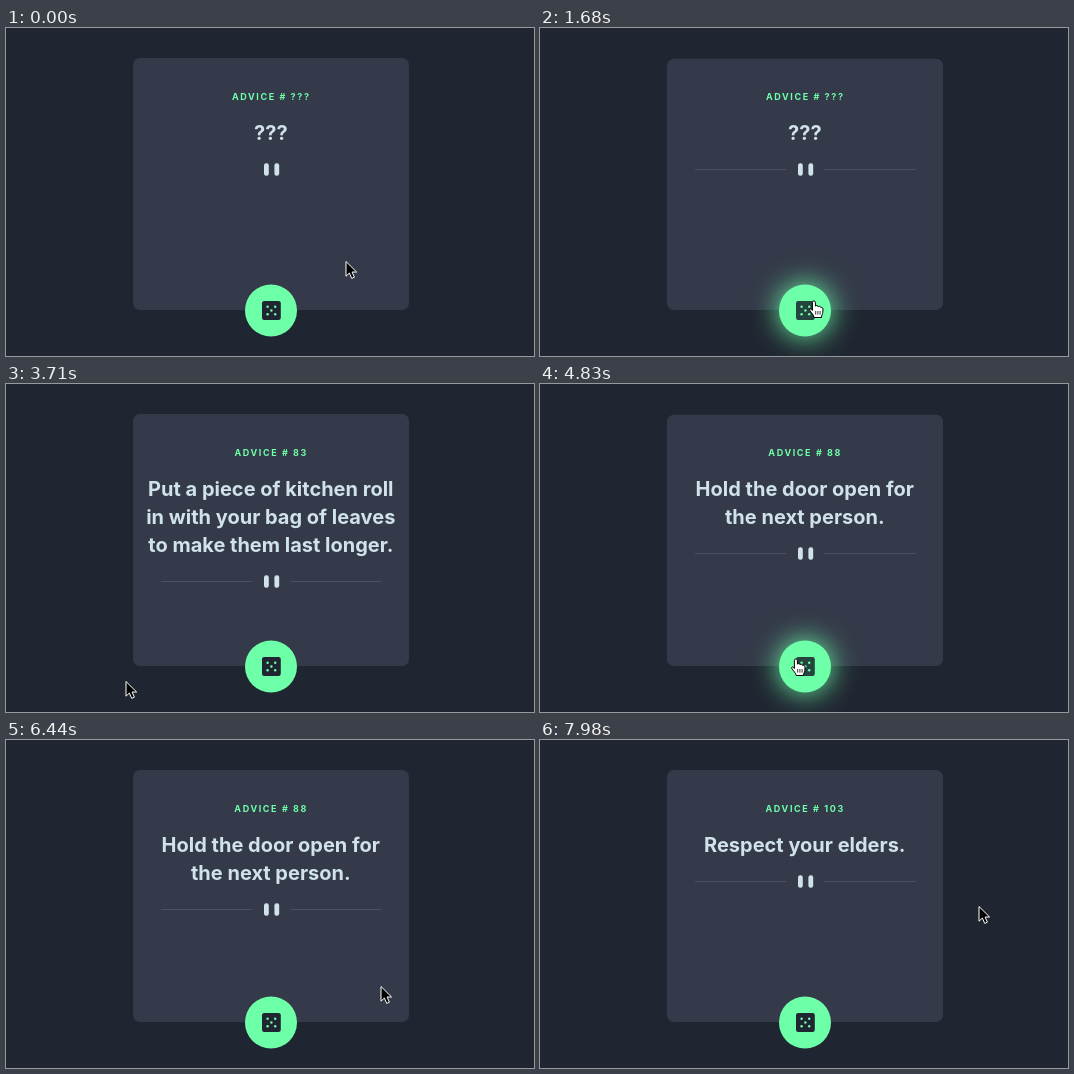
An HTML page for the animation above (8 s loop, 528 by 328 pixels).

```html
<!DOCTYPE html>
<html lang="en">
<head>
<meta charset="utf-8">
<title>Advice card</title>
<style>
  html, body { margin: 0; width: 100%; height: 100%; overflow: hidden; background: #202631; }
  svg { display: block; width: 528px; height: 328px; }
  text { font-family: Inter, "Open Sans", sans-serif; font-weight: 700; text-anchor: middle; }
  #label { font-size: 9px; letter-spacing: 1.6px; fill: #6effa9; }
  .quote { font-size: 20px; fill: #d0e2ea; }
</style>
</head>
<body>
<svg viewBox="0 0 528 328">
  <defs>
    <filter id="blur" x="-150%" y="-150%" width="400%" height="400%" color-interpolation-filters="sRGB">
      <feGaussianBlur stdDeviation="14"/>
    </filter>
  </defs>
  <rect width="528" height="328" fill="#202631"/>
  <rect id="card" x="127" width="276" rx="7" fill="#343a49"/>
  <text id="label" x="265.2" y="72"></text>
  <g id="quote"></g>
  <g id="divider">
    <path id="rules" d="M155 0H246M284.5 0H375.6" stroke="#485265"/>
    <g fill="#d0e2ea">
      <rect x="258" y="-6.2" width="4.8" height="12.4" rx="2.2"/>
      <rect x="268.4" y="-6.2" width="4.8" height="12.4" rx="2.2"/>
    </g>
  </g>
  <circle id="glow" cx="265" cy="282.5" r="26" fill="#6effa9" filter="url(#blur)"/>
  <circle cx="265" cy="282.5" r="26" fill="#6effa9"/>
  <g id="die" transform="translate(265.4 282.5)">
    <rect id="face" x="-9.4" y="-9.4" width="18.8" height="18.8" rx="2.2"/>
  </g>
  <g id="cursor">
    <path id="arrow" d="M0 .5V15.2L3.4 12L5.7 17.4L8.4 16.2L6.1 11H10.6Z" fill="#000" stroke="#fff"/>
    <g id="hand" stroke="#000" stroke-linejoin="round">
      <path d="M-1.6 9.5V1.2C-1.6 -.6 1.3 -.6 1.3 1.2L1.5 5.2C1.8 4.2 4 4.3 4.2 5.8C4.6 4.9 6.6 5.1 6.8 6.6C7.4 6 9 6.4 9 8L8.8 11.5C8.6 13.3 7.6 14 7.5 16.5H.2C-.2 14 -2.6 12 -4.2 9.4C-5 7.8 -3 7 -1.6 9.5Z"
        fill="#fff"/>
      <path d="M1.7 10V13.6M3.9 10V13.6M6.1 10V13.6" fill="none" stroke-width=".8"/>
    </g>
  </g>
</svg>
<script>
const LOOP = 8000, STEP = 70, LINE = 28;
const BUTTON = { x: 265, y: 282.5, r: 26 };
const $ = id => document.getElementById(id);

function add(parent, tag, attrs) {
  const el = document.createElementNS('http://www.w3.org/2000/svg', tag);
  for (const key in attrs) el.setAttribute(key, attrs[key]);
  return parent.appendChild(el);
}

const quoteLines = [0, 1, 2].map(i =>
  add($('quote'), 'text', { class: 'quote', x: 264.8, y: 112 + LINE * i }));

// five pips: the centre and four corners
add($('die'), 'circle', { r: 1.2, fill: '#6effa9' });
for (const cx of [-3.8, 3.8])
  for (const cy of [-3.8, 3.8]) add($('die'), 'circle', { cx, cy, r: 1.2, fill: '#6effa9' });

const advice = [
  { from: 0, id: '???', lines: ['???'] },
  { from: 2660, id: '83', lines: ['Put a piece of kitchen roll', 'in with your bag of leaves', 'to make them last longer.'] },
  { from: 4830, id: '88', lines: ['Hold the door open for', 'the next person.'] },
  { from: 7700, id: '103', lines: ['Respect your elders.'] }
];

// each move eases the pointer from wherever it rests
const moves = [
  { from: 0, to: 910, x: 294, y: 234 },
  { from: 910, to: 1680, x: 274, y: 273 },
  { from: 3080, to: 3710, x: 120, y: 297 },
  { from: 3710, to: 4200, x: 262, y: 277 },
  { from: 4760, to: 5040, x: 225, y: 262 },
  { from: 5040, to: 5250, x: 249, y: 281 },
  { from: 5740, to: 6440, x: 375, y: 246 },
  { from: 6440, to: 7420, x: 272, y: 277 },
  { from: 7630, to: 7980, x: 439, y: 166 }
];

const clamp = p => Math.min(1, Math.max(0, p));
const ease = p => p * p * (3 - 2 * p);
const lerp = (a, b, p) => a + (b - a) * p;

function pointer(t) {
  let x = 340, y = 233;
  for (const m of moves) {
    const p = ease(clamp((t - m.from) / (m.to - m.from)));
    x = lerp(x, m.x, p);
    y = lerp(y, m.y, p);
  }
  return [x, y];
}

function overButton(t) {
  const [x, y] = pointer(t);
  return Math.hypot(x - BUTTON.x, y - BUTTON.y) < BUTTON.r;
}

function draw(time) {
  const t = Math.floor(time / STEP) * STEP;
  const { id, lines } = advice.filter(a => a.from <= t).pop();
  $('label').textContent = 'ADVICE # ' + id;
  quoteLines.forEach((el, i) => { el.textContent = lines[i] || ''; });
  $('divider').setAttribute('transform', `translate(0 ${113.5 + LINE * lines.length})`);
  $('rules').style.display = t < STEP ? 'none' : '';

  const over = overButton(t);
  const hover = (over + overButton(t - STEP)) / 2;
  $('glow').setAttribute('opacity', hover);
  $('card').setAttribute('y', 30 + .7 * hover);
  $('card').setAttribute('height', 252 - .7 * hover);
  $('face').setAttribute('fill', `rgb(${lerp(32, 36, hover)}, ${lerp(38, 68, hover)}, ${lerp(49, 62, hover)})`);

  const [x, y] = pointer(t);
  $('cursor').setAttribute('transform', `translate(${Math.round(x)} ${Math.round(y)})`);
  $('arrow').style.display = over ? 'none' : '';
  $('hand').style.display = over ? '' : 'none';
}

const start = performance.now();
function tick() {
  draw((performance.now() - start) % LOOP);
  requestAnimationFrame(tick);
}
tick();
</script>
</body>
</html>
```
